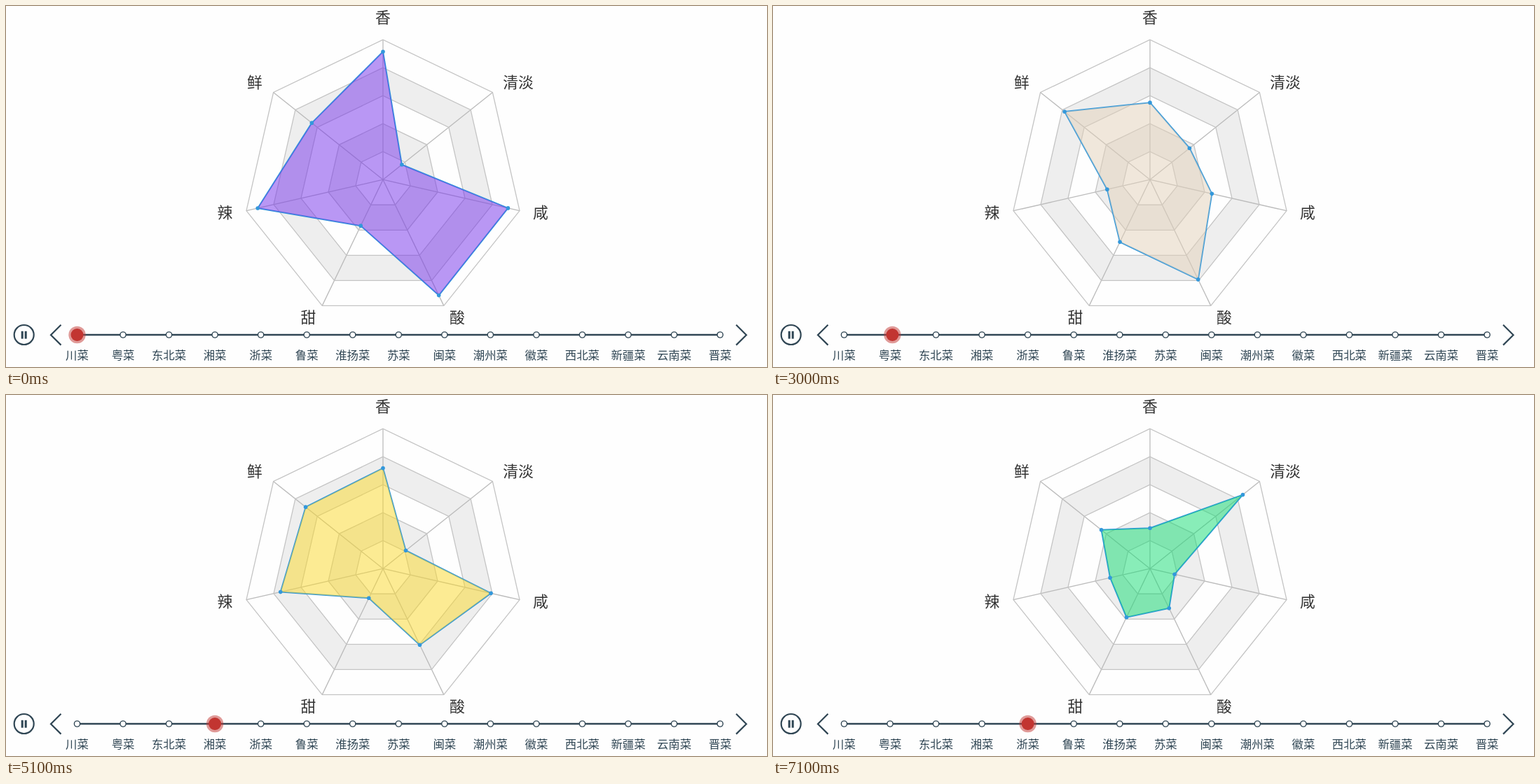
An HTML page that plays this animation: 1086x516 px, repeating every 8 s.

```html
<!DOCTYPE html>
<html lang="zh-CN">
<head>
<meta charset="utf-8">
<title>菜系口味雷达图</title>
<style>
  html, body { margin: 0; width: 100%; height: 100%; overflow: hidden; background: #fefefe; }
  svg { display: block; }
  text { font-family: "Noto Sans CJK SC", "Noto Sans CJK", sans-serif; font-weight: 300; text-anchor: middle; }
  .axis-name { font-size: 21.8px; fill: #333; }
  .tick-name { font-size: 16.4px; fill: #304654; }
  .grid { fill: none; stroke: #c4c4c4; stroke-width: 1.3; }
  .spoke { stroke: #bbb; stroke-width: 1.3; }
  .control { fill: none; stroke: #304654; stroke-width: 2.2; }
  .stop { fill: #fff; stroke: #304654; stroke-width: 1.4; }
</style>
</head>
<body>
<svg id="stage" width="1086" height="516" viewBox="0 0 1086 516"></svg>
<script>
const LOOP = 8000, STEP = 100, DURATION = 300;
const CX = 538, CY = 248.2, R = 200;
const LINE_Y = 470, FIRST_X = 101.5, GAP = 65.54;

// label, x, y of each axis name, counter-clockwise from the top
const axes = [
  ['香', 538, 16], ['鲜', 355, 109], ['辣', 312.5, 295], ['甜', 431.5, 445],
  ['酸', 644, 445], ['咸', 763, 295], ['清淡', 731, 109]
];
const cuisines = ['川菜', '粤菜', '东北菜', '湘菜', '浙菜', '鲁菜', '淮扬菜', '苏菜',
  '闽菜', '潮州菜', '徽菜', '西北菜', '新疆菜', '云南菜', '晋菜'];

// start: when the move to this state begins
const states = [
  { start: -DURATION, color: 'rgb(119,51,235)', values: [91.5, 65, 91.7, 36.6, 91.8, 91.5, 17.2] },
  { start: 1065, color: 'rgb(95,21,47)', values: [44.6, 71, 20.8, 77.4, 61, 90.5, 91.5] },
  { start: 2905, color: 'rgb(227,209,185)', values: [59.9, 81.2, 36.3, 36.4, 87.7, 24.1, 10.1] },
  { start: 4779, color: 'rgb(251,217,43)', values: [71.8, 70.6, 75, 23.3, 60.5, 79, 20.8] },
  { start: 6759, color: 'rgb(21,221,117)', values: [29, 44.4, 29.2, 38.6, 31.4, 18, 84.7] }
];

const stage = document.getElementById('stage');

function add(tag, attrs, text) {
  const node = document.createElementNS('http://www.w3.org/2000/svg', tag);
  for (const key in attrs) node.setAttribute(key, attrs[key]);
  if (text) node.textContent = text;
  return stage.appendChild(node);
}

function point(i, percent) {
  const angle = i * 2 * Math.PI / axes.length;
  const r = R * percent / 100;
  return [CX - r * Math.sin(angle), CY - r * Math.cos(angle)];
}

const path = values => 'M' + values.map((v, i) => point(i, v).map(n => n.toFixed(2))).join('L') + 'Z';
const ring = percent => path(axes.map(() => percent));

// radar grid
for (const outer of [40, 80]) {
  add('path', { d: ring(outer) + ring(outer - 20), fill: '#eee', 'fill-rule': 'evenodd' });
}
axes.forEach((_, i) => {
  const [x2, y2] = point(i, 100);
  add('line', { class: 'spoke', x1: CX, y1: CY, x2, y2 });
});
for (let p = 20; p <= 100; p += 20) add('path', { class: 'grid', d: ring(p) });
axes.forEach(([name, x, y]) => add('text', { class: 'axis-name', x, y: y + 8.3 }, name));

// radar data
const outline = add('path', { fill: 'none', stroke: '#3398db', 'stroke-width': 2, 'stroke-linejoin': 'bevel' });
const area = add('path', { 'fill-opacity': 0.5 });
const dots = axes.map(() => add('circle', { r: 2.8, fill: '#3398db' }));

// timeline
add('line', { x1: FIRST_X, y1: LINE_Y, x2: FIRST_X + 14 * GAP, y2: LINE_Y, stroke: '#304654', 'stroke-width': 2.7 });
cuisines.forEach((name, i) => {
  const x = FIRST_X + i * GAP;
  add('circle', { class: 'stop', cx: x, cy: LINE_Y, r: 4.1 });
  add('text', { class: 'tick-name', x, y: 505 }, name);
});
add('circle', { class: 'control', cx: 25.7, cy: LINE_Y, r: 14 });
for (const x of [21.7, 26.7]) add('rect', { x, y: 464.8, width: 3, height: 10.8, fill: '#304654' });
add('path', { class: 'control', d: 'M78.5 455.8L64 470.2L78.5 484.6' });
add('path', { class: 'control', d: 'M1042 455.8L1056.5 470.2L1042 484.6' });
const halo = add('circle', { cy: LINE_Y, r: 12.2, fill: '#c23531', 'fill-opacity': 0.5 });
const marker = add('circle', { cy: LINE_Y, r: 9, fill: '#c23531' });

const cubicOut = t => 1 - (1 - t) ** 3;
const quinticInOut = t => t < 0.5 ? 16 * t ** 5 : 1 - 16 * (1 - t) ** 5;

function draw(time) {
  const now = Math.floor(time % LOOP / STEP) * STEP;
  const index = states.findLastIndex(s => s.start <= now);
  const to = states[index], from = states[Math.max(0, index - 1)];
  const t = Math.min(1, (now - to.start) / DURATION);
  const k = cubicOut(t);
  const values = to.values.map((v, i) => from.values[i] + (v - from.values[i]) * k);

  const d = path(values);
  outline.setAttribute('d', d);
  area.setAttribute('d', d);
  area.setAttribute('fill', to.color);
  dots.forEach((dot, i) => {
    const [x, y] = point(i, values[i]);
    dot.setAttribute('cx', x);
    dot.setAttribute('cy', y);
  });

  const x = FIRST_X + GAP * (index ? index - 1 + quinticInOut(t) : 0);
  halo.setAttribute('cx', x);
  marker.setAttribute('cx', x);
}

const begin = performance.now();
function frame() {
  draw(performance.now() - begin);
  requestAnimationFrame(frame);
}
frame();
</script>
</body>
</html>
```
